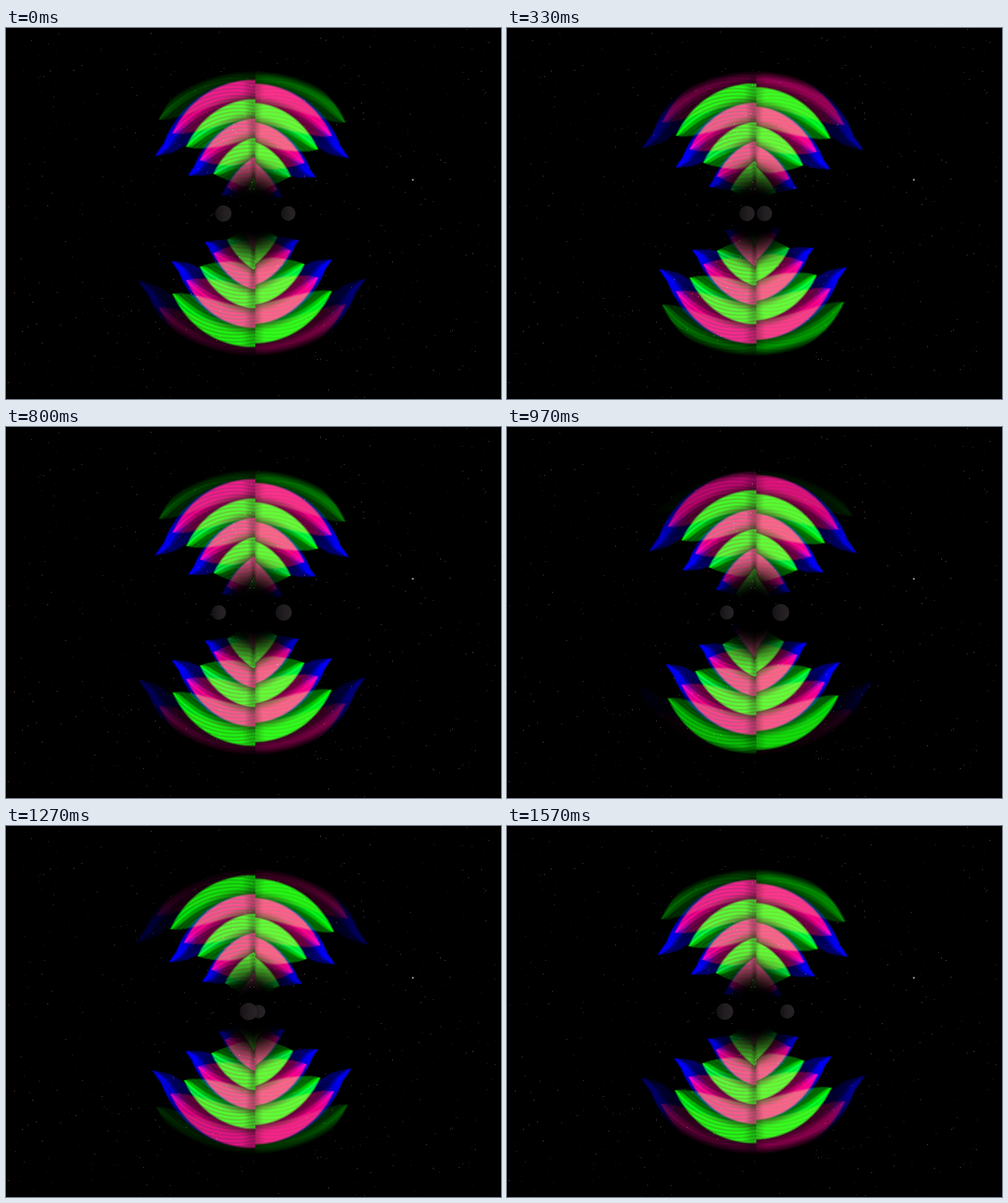
Animation of 800 by 600 pixels, one loop 1.61 s. Source, as an HTML page with a canvas:

```html
<!DOCTYPE html>
<html lang="en">
<head>
<meta charset="utf-8">
<title>Binary orbit waves</title>
<style>
  html, body { margin: 0; width: 100%; height: 100%; overflow: hidden; background: #000; }
  canvas { display: block; }
</style>
</head>
<body>
<canvas id="stage" width="800" height="600"></canvas>
<script>
const LOOP = 1610, WAVELENGTH = 62, CX = 400, CY = 300;
const BOX = { x: 165, y: 66, w: 470, h: 468 };
const ctx = document.getElementById('stage').getContext('2d');

const makeCanvas = (w, h) => Object.assign(document.createElement('canvas'), { width: w, height: h });
const clamp = v => Math.max(0, Math.min(1, v));
const smooth = (a, b, v) => { const u = clamp((v - a) / (b - a)); return u * u * (3 - 2 * u); };

// Star field
let seed = 4711;
const random = () => (seed = (seed * 16807) % 2147483647) / 2147483647;
const sky = makeCanvas(800, 600), skyCtx = sky.getContext('2d');
skyCtx.fillStyle = '#000';
skyCtx.fillRect(0, 0, 800, 600);
const star = (x, y, light, size = 1) => {
  skyCtx.fillStyle = `rgb(${light}, ${light * 0.92}, ${light * 0.82})`;
  skyCtx.fillRect(x, y, size, size);
};
for (let i = 0; i < 650; i++)
  star(Math.floor(random() * 800), Math.floor(random() * 600), 30 + 130 * random() ** 2.5);
[[71, 69], [43, 443], [768, 70], [521, 585], [588, 30], [775, 153], [732, 552], [397, 297]]
  .forEach(([x, y]) => star(x, y, 150));
star(656, 244, 140, 3);

// Wave fans: each colour channel is a train of leaf-shaped crests running outwards.
// A leaf has a bright band below its ridge and a paler tail that overlaps the next leaf.
const channels = [
  { reach: 45.5, ridge: 45.5, start: 179 },
  { reach: 45.5, ridge: 45.5, start: 148 },
  { reach: 60, ridge: 52, start: 179 }
];
const fan = makeCanvas(BOX.w, BOX.h), fanCtx = fan.getContext('2d');
const image = fanCtx.createImageData(BOX.w, BOX.h);
const samples = [];
for (let py = 0; py < BOX.h; py++) for (let px = 0; px < BOX.w; px++) {
  const dx = px + BOX.x + 0.5 - CX, dy = CY - py - BOX.y - 0.5;
  const r = Math.hypot(dx, dy);
  const angle = Math.atan2(Math.abs(dx), Math.abs(dy)) * 180 / Math.PI;
  if (r < 30 || r > 231 || angle > 60) continue;
  const left = dx < 3;
  const gain = 255 * smooth(28, 100, r) * clamp((231 - r) / 14) * (0.75 + 0.25 * smooth(0, 6, angle));
  channels.forEach((c, i) => {
    if (angle >= c.reach) return;
    const taper = 1 - (angle / c.reach) ** 2;
    const base = r - 32 * (1 - Math.min(1, angle / c.ridge) ** (r / 110));
    samples.push({
      at: (py * BOX.w + px) * 4 + i,
      base,
      lag: c.start + (left ? 6 : 0) + (dy < 0 ? WAVELENGTH / 2 : 0) - base + 4 * WAVELENGTH,
      band: 32 * taper ** 0.6,
      tail: 66 * taper ** 0.7,
      gain: gain * (i === 2 ? 0.55 + 0.45 * smooth(32, 52, angle) : 1),
      grain: i === 2 ? 0.03 : left ? 0.1 : 0.05,
      twist: angle * 0.9
    });
  });
}
for (let i = 3; i < image.data.length; i += 4) image.data[i] = 255;

function drawFans(t) {
  const travel = t / LOOP * 2 * WAVELENGTH;
  const data = image.data;
  for (const p of samples) {
    const depth = (p.lag + travel) % WAVELENGTH;
    let value = 0;
    if (depth < p.tail) {
      const fade = 1 - smooth(178, 240, p.base + depth);
      const streak = 1 - p.grain * (1 + Math.sin(depth * 1.1 + p.twist));
      const level = 0.42 + 0.58 * (1 - smooth(0.55, 1.15, depth / p.band));
      const edge = Math.min(1, (depth + 1) / 4, (p.tail - depth) / 4);
      value = p.gain * fade * level * edge * streak;
    }
    data[p.at] = value;
  }
  fanCtx.putImageData(image, 0, 0);
  ctx.globalCompositeOperation = 'lighter';
  ctx.drawImage(fan, BOX.x, BOX.y);
  ctx.globalCompositeOperation = 'source-over';
}

function drawBody({ x, radius }) {
  const shade = ctx.createLinearGradient(x - radius, CY, x + radius, CY);
  shade.addColorStop(0, '#141214');
  shade.addColorStop(0.5, '#211d20');
  shade.addColorStop(1, '#272326');
  ctx.fillStyle = shade;
  ctx.beginPath();
  ctx.arc(x, CY, radius, 0, 2 * Math.PI);
  ctx.fill();
}

function drawBodies(t) {
  const phase = (2.5 + 0.2175 * t) * Math.PI / 180;
  const depth = Math.sin(phase) * 0.07, swing = Math.cos(phase);
  const bodies = [
    { x: CX - 49 * swing * (1 - depth), radius: 13.2 * (1 - depth) },
    { x: CX + 56 * swing * (1 + depth), radius: 11.6 * (1 + depth) }
  ];
  if (depth < 0) bodies.reverse();
  bodies.forEach(drawBody);
}

function render() {
  const t = performance.now() % LOOP;
  ctx.drawImage(sky, 0, 0);
  drawFans(t);
  drawBodies(t);
  requestAnimationFrame(render);
}
render();
</script>
</body>
</html>
```
